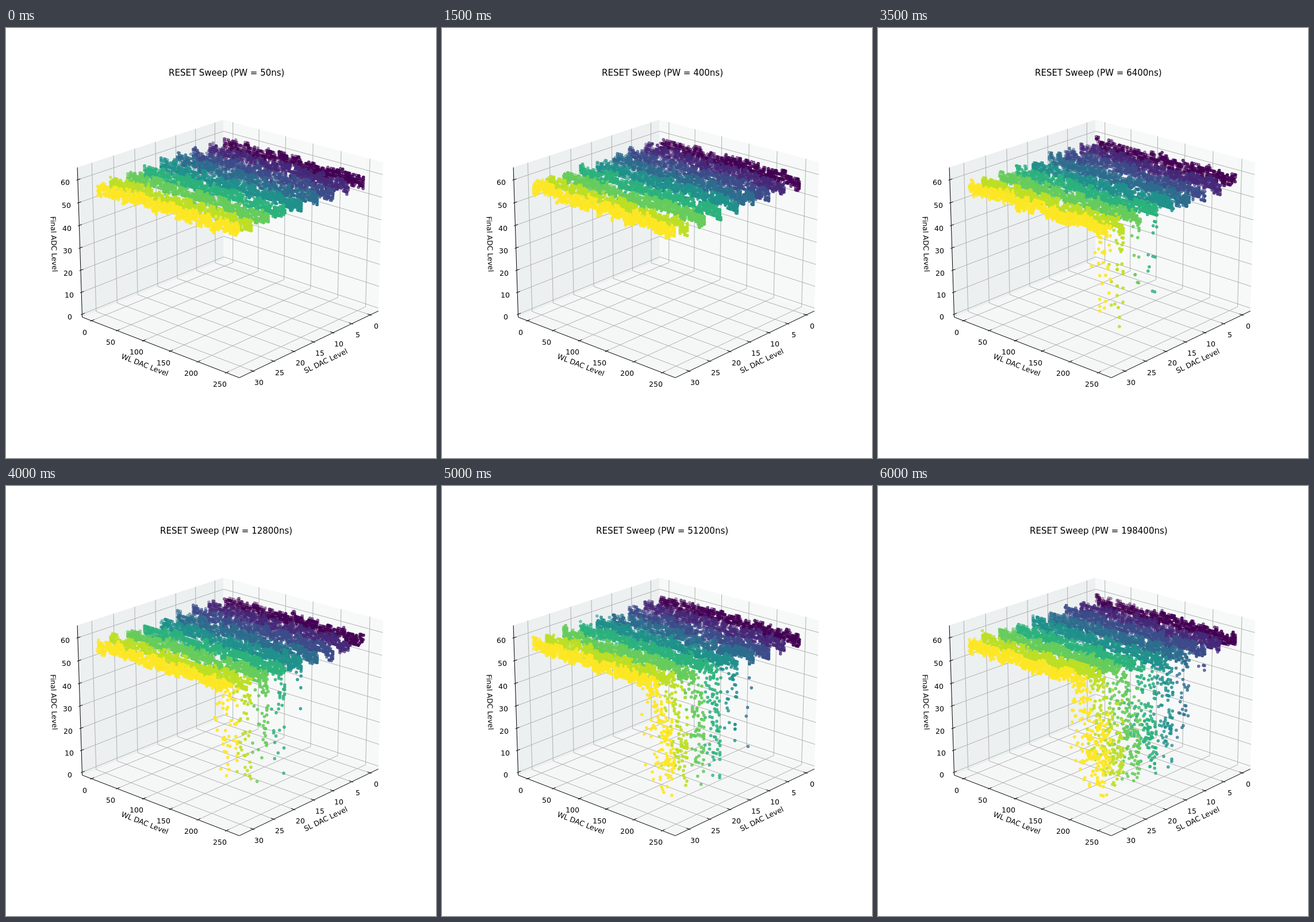
Animation, 748 px wide and 748 px high, one loop 6.5 s. Source, as an HTML page with a canvas:

```html
<!DOCTYPE html>
<html lang="en">
<head>
<meta charset="utf-8">
<title>RESET Sweep</title>
<style>
  html, body { margin: 0; height: 100%; overflow: hidden; background: #fff; }
  canvas { display: block; }
</style>
</head>
<body>
<canvas id="stage" width="748" height="748"></canvas>
<script>
const ctx = document.getElementById('stage').getContext('2d');
const STEP = 500, STEPS = 13, FONT = '"DejaVu Sans", sans-serif';
const rad = Math.PI / 180, ELEV = 21 * rad, AZIM = 42 * rad;

// Axis limits, including the margin around the data.
const SL = [-2.26, 33.26], WL = [-18.52, 272.52], ADC = [-1.333, 65.333];

// Sweep levels with their colour and the step at which cells start to reset.
const bands = [
  [0, '#440154', 20], [4, '#472a7a', 20], [8, '#3d4d8a', 12.8],
  [12, '#2e6d8e', 10.4], [16, '#21918c', 9], [20, '#2db27d', 7.1],
  [24, '#67cc5c', 6.6], [28, '#bddf26', 6], [31, '#fde725', 5.3]
];

// Perspective projection of a data point: [x, y, nearness].
function project(sl, wl, adc) {
  const norm = (v, [lo, hi], size) => ((v - lo) / (hi - lo) - 0.5) * size;
  const x = norm(sl, SL, 1.1905), y = norm(wl, WL, 1.1905), z = norm(adc, ADC, 0.8929);
  const along = Math.cos(AZIM) * x + Math.sin(AZIM) * y;
  const right = Math.cos(AZIM) * y - Math.sin(AZIM) * x;
  const up = Math.cos(ELEV) * z - Math.sin(ELEV) * along;
  const near = Math.cos(ELEV) * along + Math.sin(ELEV) * z;
  const scale = 3113 / (10 - near);
  return [391.2 + right * scale, 369.9 - up * scale, near];
}

function randomizer(seed) {
  return () => {
    seed = (seed + 0x6D2B79F5) | 0;
    let t = Math.imul(seed ^ (seed >>> 15), 1 | seed);
    t = (t + Math.imul(t ^ (t >>> 7), 61 | t)) ^ t;
    return ((t ^ (t >>> 14)) >>> 0) / 4294967296;
  };
}

function path(...points) {
  ctx.beginPath();
  for (const p of points) ctx.lineTo(...project(...p).slice(0, 2));
}

function line(color, ...points) {
  path(...points);
  ctx.strokeStyle = color;
  ctx.stroke();
}

function pane(color, ...points) {
  path(...points);
  ctx.fillStyle = color;
  ctx.fill();
}

// Centred text; level text starts on whole pixels to stay crisp.
function label(text, x, y, size = 12.5, angle = 0) {
  ctx.save();
  ctx.font = `${size}px ${FONT}`;
  ctx.fillStyle = '#000';
  const left = -ctx.measureText(text).width / 2, base = size * 0.36;
  if (angle) {
    ctx.translate(x, y);
    ctx.rotate(angle * rad);
    ctx.fillText(text, left, base);
  } else {
    ctx.fillText(text, Math.round(x + left), Math.round(y + base));
  }
  ctx.restore();
}

function tick(value, from, to, at, dx, dy) {
  line('#000', from, to);
  const [x, y] = project(...at);
  label(String(value), x + dx, y + dy);
}

function drawAxes() {
  const [s0, s1] = SL, [w0, w1] = WL, [a0, a1] = ADC, grid = '#b0b0b0';
  const sOut = (s1 - s0) / 120, wOut = (w1 - w0) / 120;
  ctx.lineWidth = 1;
  pane('#ecf0f0', [s0, w0, a0], [s1, w0, a0], [s1, w0, a1], [s0, w0, a1]);
  pane('#f7f9f9', [s0, w0, a0], [s0, w1, a0], [s0, w1, a1], [s0, w0, a1]);
  pane('#f5f6f6', [s0, w0, a0], [s1, w0, a0], [s1, w1, a0], [s0, w1, a0]);

  for (let s = 0; s <= 30; s += 5) line(grid, [s, w1, a0], [s, w0, a0], [s, w0, a1]);
  for (let w = 0; w <= 250; w += 50) line(grid, [s1, w, a0], [s0, w, a0], [s0, w, a1]);
  for (let a = 0; a <= 60; a += 10) line(grid, [s1, w0, a], [s0, w0, a], [s0, w1, a]);

  line('#000', [s1, w0, a1], [s1, w0, a0], [s1, w1, a0], [s0, w1, a0]);
  for (let s = 0; s <= 30; s += 5)
    tick(s, [s, w1 + wOut, a0], [s, w1 - 2 * wOut, a0], [s, w1, a0], 10.5, 19.5);
  for (let w = 0; w <= 250; w += 50)
    tick(w, [s1 + sOut, w, a0], [s1 - 2 * sOut, w, a0], [s1, w, a0], -11.5, 20);
  for (let a = 0; a <= 60; a += 10)
    tick(a, [s1 + sOut, w0, a], [s1 - 2 * sOut, w0, a], [s1, w0, a], -21.5, 5);

  label('WL DAC Level', 241.5, 586, 12.5, 21.2);
  label('SL DAC Level', 556, 579, 12.5, -25.8);
  label('Final ADC Level', 83.5, 376, 12.5, 88);
}

// Cells sit near level 57. Around the onset they sag, then drop to low levels.
function makePoints(step) {
  const random = randomizer(step * 977 + 41), points = [];
  for (const [sl, color, start] of bands) {
    const onset = 255 - (step - start) * 8.5;
    const sparse = sl === 31 && step > 6 && step < 10;
    let shift = 0;
    for (let wl = 0; wl <= 254; wl += 2) {
      const past = wl - onset, count = 2 + random() * 9;
      if (wl % 8 === 0) shift = random() * 2.4 - 1.2;
      const low = 53.8 + shift + random() * 1.5, high = 58.4 + shift + random() * 1.5;
      for (let n = 0; n < count; n++) {
        if (sparse && past > 8 && random() < 0.7) continue;
        let adc = low + random() * (high - low);
        if (random() < (past + 20) / 40) {
          const fall = Math.pow(random(), Math.max(0.35, 2 - past / 18));
          adc -= 46 * fall * (0.65 + 0.35 * random());
        }
        const [x, y, near] = project(sl, wl, Math.round(adc));
        points.push({ x, y, near, color });
      }
    }
  }
  return points.sort((a, b) => a.near - b.near);
}

function drawPoints(points) {
  const far = points[0].near, range = points[points.length - 1].near - far;
  ctx.lineWidth = 1.25;
  for (const { x, y, near, color } of points) {
    ctx.globalAlpha = 0.3 + 0.7 * (near - far) / range;
    ctx.fillStyle = ctx.strokeStyle = color;
    ctx.beginPath();
    ctx.arc(x, y, 2.2, 0, 2 * Math.PI);
    ctx.fill();
    ctx.stroke();
  }
  ctx.globalAlpha = 1;
}

function draw(step) {
  const width = step === STEPS - 1 ? 198400 : 50 * 2 ** step;
  ctx.fillStyle = '#fff';
  ctx.fillRect(0, 0, 748, 748);
  drawAxes();
  drawPoints(makePoints(step));
  label(`RESET Sweep (PW = ${width}ns)`, 383.35, 77.6, 15);
}

let shown = -1;
function update() {
  const step = Math.floor(performance.now() / STEP) % STEPS;
  if (step !== shown) draw(shown = step);
  requestAnimationFrame(update);
}
update();
</script>
</body>
</html>
```
